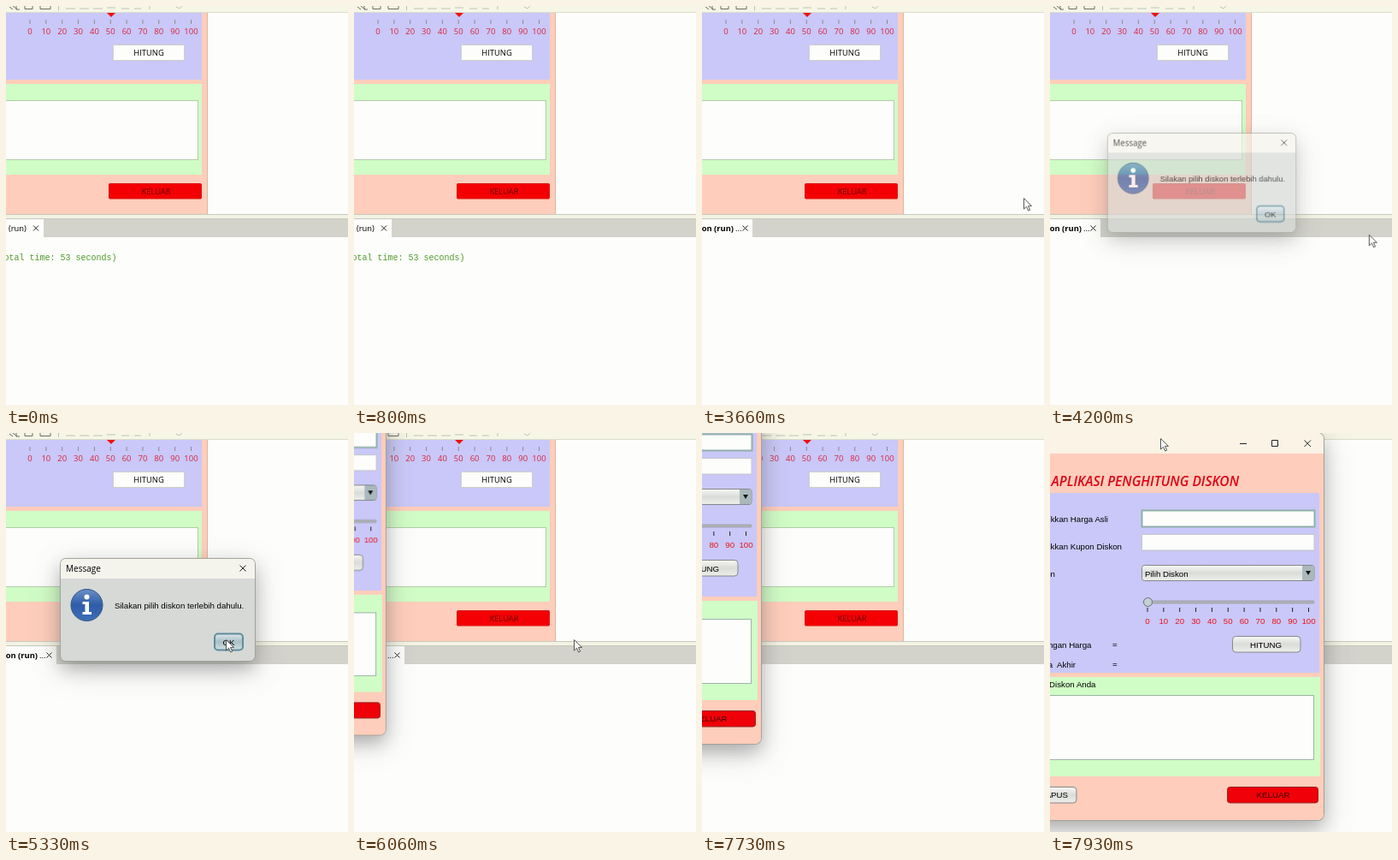
An HTML page for the animation above (8 s loop, 400 by 466 pixels).

```html
<!DOCTYPE html>
<html lang="id">
<head>
<meta charset="utf-8">
<title>Penghitung Diskon</title>
<style>
  html, body { margin: 0; width: 100%; height: 100%; overflow: hidden; background: #fdfdfc; }
  #stage { position: relative; width: 400px; height: 466px; overflow: hidden; }
  #stage > *, .win svg { position: absolute; left: 0; top: 0; }
  svg { display: block; overflow: visible; }
  text { font: 9.7px "Liberation Sans", Arial, sans-serif; fill: #000; dominant-baseline: central; }
  .ide text { font: 9.4px "Open Sans", "Noto Sans", sans-serif; }
  .mid { text-anchor: middle; }
  .end { text-anchor: end; }
  .ide .num { fill: #dc2038; font-size: 9.5px; }
  .num { fill: #f01018; }
  .ide .bold { font-weight: 700; }
  .ide .log { font: 10px "Liberation Mono", monospace; fill: #4f9a28; }
  .bar { font: 10px "Open Sans", "Noto Sans", sans-serif; }
  .head { font: italic 600 15.6px "Open Sans", "Noto Sans", sans-serif; fill: #e00014; }
  .line { fill: none; stroke: #222; }
  .peach { fill: #ffcdbb; }
  .lilac { fill: #c9c8f8; }
  .mint { fill: #d0fcc6; }
  .white { fill: #fdfdfc; }

  .win { box-shadow: 0 0 0 1px #a3a39c, 0 9px 20px rgba(60, 60, 70, .3), 0 10px 36px rgba(120, 120, 105, .3); }
  #dialog { left: 64px !important; top: 147px !important; width: 227px; height: 119px; border-radius: 6px;
    animation: dialog 8s infinite; }
  #app { position: absolute; left: -96px; width: 416px; height: 452px; border-radius: 7px;
    animation: move 8s step-end infinite; }
  #app svg { left: 96px; }
  #open { width: 0; height: 0; transform-origin: -167px 131px; animation: open 8s infinite; }
  #cursor { animation: point 8s linear infinite, seen 8s step-end infinite; }
  .before { animation: before 8s step-end infinite; }
  .after { animation: after 8s step-end infinite; }

  @keyframes before { 0% { opacity: 1 } 35%, 100% { opacity: 0 } }
  @keyframes after { 0% { opacity: 0 } 35%, 100% { opacity: 1 } }
  @keyframes dialog {
    0%, 51% { opacity: 0; transform: scale(.9); animation-timing-function: ease-out }
    54.125%, 67.4% { opacity: 1; transform: none }
    68.25%, 100% { opacity: 0; transform: scale(.95) }
  }
  @keyframes open {
    0%, 74% { opacity: 0; transform: scale(.91) }
    75%, 75.75% { opacity: 1; transform: scale(.98); animation-timing-function: ease-out }
    78%, 100% { opacity: 1; transform: none }
  }
  @keyframes move {
    0% { transform: translate(-279px, -95px) }
    96.625% { transform: translate(-251px, -89px) }
    97.5% { transform: translate(-176px, -62px) }
    98.25% { transform: translate(-82px, -29px) }
    99.125%, 100% { transform: none }
  }
  @keyframes point {
    0%, 44.125% { transform: translate(388px, 217px) }
    45.75% { transform: translate(376px, 224px) }
    54.125%, 56.625% { transform: translate(372px, 277px) }
    57.5%, 60% { transform: translate(357px, 277px); animation-timing-function: ease-in-out }
    66.25%, 99.12% { transform: translate(257px, 241px) }
    99.125%, 100% { transform: translate(129px, 6px) }
  }
  @keyframes seen {
    0% { opacity: 0 }
    44.125% { opacity: 1 }
    84.125% { opacity: 0 }
    99.125%, 100% { opacity: 1 }
  }
</style>
</head>
<body>
<div id="stage">
  <svg class="ide" width="400" height="466">
    <rect class="white" width="400" height="466"/>
    <rect width="400" height="7" fill="#f6f6e6"/>
    <path d="M0 7.500H400" stroke="#dcdccf"/>
    <g fill="none" stroke="#6d6d68">
      <path d="M4 1l4 3M8 0l5 4M12 0v4h4M22 0v3.500h9V0M40 0v3.500h12V0"/>
      <path d="M61.500 0v5M70 3h11M86 3h11M102 3h11M118 2h10M135 3h9M150 3h8M168 0v4M199 1l4 2 3-3" stroke="#c0c0b8"/>
    </g>

    <rect class="peach" y="8" width="235" height="236"/>
    <rect class="lilac" y="8" width="229" height="78"/>
    <rect class="mint" y="91" width="229" height="106"/>
    <rect class="white" x="-2" y="110.500" width="226.500" height="69" stroke="#b4cca8"/>
    <path d="M235.500 8V244" stroke="#d9b79c"/>
    <path d="M118 8h10l-5 5z" fill="#ee1111"/>
    <g data-ticks="28 18.85 16 29" stroke="#8d8b8b"></g>
    <rect class="white" x="125.500" y="45.500" width="83" height="18" rx="1" stroke="#cfcfc4"/>
    <text class="mid" x="167" y="54.500">HITUNG</text>
    <rect x="120.500" y="207.500" width="108" height="17.500" rx="1" fill="#f40004" stroke="#d91010"/>
    <text class="mid" x="175.500" y="216.500" style="fill:#6a0000">KELUAR</text>

    <rect y="244" width="400" height="5" fill="#f3f3e4"/>
    <path d="M0 243.500H400M0 248.500H400" stroke="#c8c8be"/>
    <rect y="249" width="400" height="21" fill="#d3d3cc"/>
    <g class="before">
      <rect class="white" y="249" width="44" height="21"/>
      <text x="3" y="259.500">(run)</text>
      <path class="line" d="M32 256.500l6 6m0-6l-6 6"/>
      <text class="log" x="-2.500" y="294" xml:space="preserve">otal time: 53 seconds)</text>
    </g>
    <g class="after">
      <rect class="white" y="249" width="59" height="21"/>
      <text class="end bold" x="37" y="259.500">on (run)</text>
      <text x="39" y="259.500">...</text>
      <path class="line" d="M47.500 256.500l6 6m0-6l-6 6"/>
    </g>
  </svg>

  <div id="dialog" class="win">
    <svg width="227" height="119">
      <defs>
        <linearGradient id="btn" x2="0" y2="1">
          <stop stop-color="#f8f8f4"/><stop offset=".5" stop-color="#dadcd9"/><stop offset="1" stop-color="#eeefe9"/>
        </linearGradient>
        <linearGradient id="ok" x2="0" y2="1">
          <stop stop-color="#dfe8ea"/><stop offset=".5" stop-color="#a9bec6"/><stop offset="1" stop-color="#d3e0e0"/>
        </linearGradient>
        <linearGradient id="blue" x2="0" y2="1">
          <stop stop-color="#6b91c8"/><stop offset=".5" stop-color="#2f5ca8"/><stop offset="1" stop-color="#3d6fb8"/>
        </linearGradient>
      </defs>
      <rect width="227" height="119" rx="6" fill="#d6d9d6"/>
      <path d="M0 23V6a6 6 0 0 1 6-6H221a6 6 0 0 1 6 6V23z" fill="#f5f4ec"/>
      <text class="bar" x="6" y="11.500">Message</text>
      <path class="line" d="M209.500 7.500l7 7m0-7l-7 7"/>
      <circle cx="30.500" cy="54" r="18.500" fill="url(#blue)" stroke="#315384"/>
      <circle cx="30.500" cy="44.500" r="3" fill="#fff"/>
      <path d="M25.500 50h7.500v12h3v3H25.500v-3h3v-9h-3z" fill="#fff"/>
      <text x="63" y="54.500">Silakan pilih diskon terlebih dahulu.</text>
      <rect x="180" y="87.500" width="33" height="19" rx="4" fill="url(#ok)" stroke="#5f8c9c" stroke-width="2"/>
      <text class="mid" x="196.500" y="97.500">OK</text>
    </svg>
  </div>

  <div id="open">
    <div id="app" class="win">
      <svg width="320" height="452">
        <rect class="peach" x="-96" width="416" height="452" rx="7"/>
        <path d="M-96 24V0H313a7 7 0 0 1 7 7V24z" fill="#faf3e6"/>
        <path class="line" d="M222 12.500h8M259.500 8.500h7v7h-7zM297.500 8.500l7.500 7.500m0-7.500l-7.500 7.500"/>
        <text class="head end" x="221" y="56">APLIKASI PENGHITUNG DISKON</text>
        <rect class="lilac" x="-90" y="70" width="405" height="210"/>
        <text class="end" x="68" y="100.500">Masukkan Harga Asli</text>
        <text class="end" x="84" y="132.500">Masukkan Kupon Diskon</text>
        <text class="end" x="6" y="164.500">Diskon</text>
        <text class="end" x="48.500" y="247.500">Potongan Harga</text>
        <text class="end" x="30" y="270.500" xml:space="preserve">Harga  Akhir</text>
        <text x="73" y="247">=</text>
        <text x="73" y="270">=</text>
        <rect class="white" x="107.500" y="90.500" width="202" height="19" stroke="#8fb0a8" stroke-width="2"/>
        <rect class="white" x="107.500" y="118.500" width="201.500" height="18.500" stroke="#c6c6c6"/>
        <rect x="107.500" y="154.500" width="201.500" height="18" rx="3" fill="url(#btn)" stroke="#85878a"/>
        <path d="M295 155h11a3 3 0 0 1 3 3v11a3 3 0 0 1-3 3h-11z" fill="#aab8bb"/>
        <path d="M299 161h6l-3 5z" fill="#151515"/>
        <text x="111" y="164.500">Pilih Diskon</text>
        <rect x="109" y="196" width="200" height="3" rx="1.500" fill="#b2b3b8" stroke="#8c8d92" stroke-width=".6"/>
        <circle cx="114.500" cy="197.500" r="5" fill="#c3cfd2" stroke="#66707a"/>
        <g data-ticks="114 18.850 204 219.500" stroke="#222"></g>
        <rect x="213.500" y="237.500" width="79.500" height="18.500" rx="4" fill="url(#btn)" stroke="#85878a"/>
        <text class="mid" x="252.500" y="247.500">HITUNG</text>
        <rect class="mint" x="-90" y="285" width="406" height="116"/>
        <text class="end" x="53.500" y="293.500">Diskon Anda</text>
        <rect class="white" x="-80" y="306.500" width="388.500" height="75" stroke="#9fb3a8"/>
        <rect x="-75" y="413.500" width="106" height="18.500" rx="4" fill="url(#btn)" stroke="#85878a"/>
        <text class="end" x="21" y="423">HAPUS</text>
        <rect x="207.500" y="413.500" width="106" height="18.500" rx="3" fill="#f00008" stroke="#8f2c28"/>
        <text class="mid" x="261" y="423" style="fill:#3a0000">KELUAR</text>
      </svg>
    </div>
  </div>

  <svg id="cursor" width="12" height="18">
    <path d="M.5.500V13l3-2.800 2.200 4.800 2-.9-2.200-4.700h4z" fill="#fff" stroke="#44443f" stroke-width=".9"/>
  </svg>
</div>
<script>
  // Slider scales: left, step, tick top, label centre
  for (const g of document.querySelectorAll('[data-ticks]')) {
    const [left, step, top, mid] = g.dataset.ticks.split(' ').map(Number);
    for (let i = 0; i <= 10; i++) {
      const x = left + i * step;
      g.innerHTML += `<path d="M${x} ${top}v5"/><text class="num mid" stroke="none" x="${x}" y="${mid}">${i * 10}</text>`;
    }
  }
</script>
</body>
</html>
```
